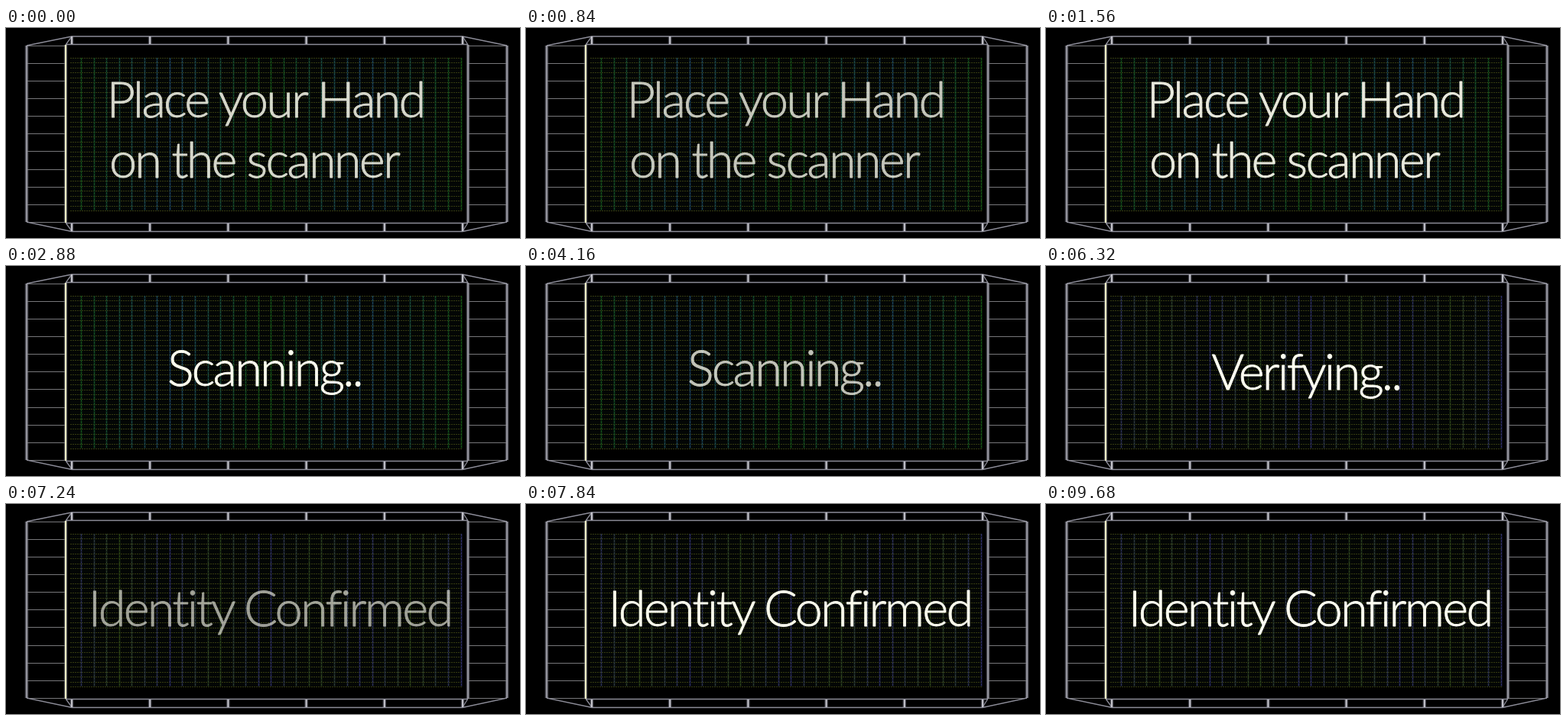
Recreate the animation shown at these times as an HTML page. Size 672 px wide and 275 px high, loop 10 s.

```html
<!DOCTYPE html>
<html lang="en">
<head>
<meta charset="utf-8">
<title>Hand scanner</title>
<style>
  html, body { margin: 0; width: 100%; height: 100%; overflow: hidden; background: #000; }
  svg { display: block; width: 100vw; height: 100vh; }
  .thin { stroke: #77777a; }
  .edge { stroke: #8c8c98; stroke-width: 1.3; }
  .halo { stroke: #62626c; stroke-width: 4.5; opacity: .75; }
  .core { stroke: #cfcfd6; stroke-width: 1.8; }
  .side { stroke: #a6a6ae; stroke-width: 1.6; }
  .inner { stroke: #f6f6c4; stroke-width: 2; }
  .rows { stroke: #353a10; }
  .soft { stroke-width: 3; opacity: .25; }
  .early { stroke: url(#teal); animation: early 10s step-end infinite; }
  .late { stroke: url(#indigo); animation: late 10s step-end infinite; }
  text {
    font: 300 65px Lato, "Open Sans", sans-serif;
    letter-spacing: -.043em;
    text-anchor: middle;
    fill: #fffff2;
    stroke: #fffff2;
    stroke-width: .8;
    stroke-linejoin: round;
  }
  .words { animation: pulse 833.333ms cubic-bezier(.37, 0, .63, 1) -1200ms infinite alternate; }
  .msg { visibility: hidden; animation: 10s step-end infinite; }
  .place { animation-name: place; }
  .scan { animation-name: scan; }
  .verify { animation-name: verify; }
  .done { animation-name: done; }
  @keyframes pulse { from { opacity: .6; } to { opacity: 1; } }
  @keyframes place { 0% { visibility: visible; } 21.2%, 100% { visibility: hidden; } }
  @keyframes scan { 0% { visibility: hidden; } 21.2% { visibility: visible; } 54.8%, 100% { visibility: hidden; } }
  @keyframes verify { 0% { visibility: hidden; } 54.8% { visibility: visible; } 71.2%, 100% { visibility: hidden; } }
  @keyframes done { 0% { visibility: hidden; } 71.2%, 100% { visibility: visible; } }
  @keyframes early { 0% { visibility: visible; } 42%, 100% { visibility: hidden; } }
  @keyframes late { 0% { visibility: hidden; } 42%, 100% { visibility: visible; } }
</style>
</head>
<body>
<svg viewBox="0 0 672 275" preserveAspectRatio="none" fill="none">
  <defs>
    <linearGradient id="teal" gradientUnits="userSpaceOnUse" x1="84" x2="212" y1="0" y2="0" spreadMethod="reflect">
      <stop stop-color="#125212"/>
      <stop offset="1" stop-color="#1c4262"/>
    </linearGradient>
    <linearGradient id="indigo" gradientUnits="userSpaceOnUse" x1="84" x2="148" y1="0" y2="0" spreadMethod="reflect">
      <stop stop-color="#2c2c68"/>
      <stop offset="1" stop-color="#2b4314"/>
    </linearGradient>
    <path id="cols"/>
  </defs>
  <rect width="672" height="275" fill="#000"/>
  <rect x="84" y="39" width="512" height="200" fill="#030605"/>
  <path class="rows" id="rows" stroke-dasharray="2 1"/>
  <g class="early">
    <use class="soft" href="#cols"/>
    <use href="#cols" stroke-dasharray="3 1"/>
  </g>
  <g class="late">
    <use class="soft" href="#cols"/>
    <use href="#cols" stroke-dasharray="3 1"/>
  </g>

  <path class="halo" id="halo"/>
  <path class="thin" id="rungs"/>
  <path class="edge" d="M27 23L86 11H597L655 23M27 254L86 266.5H597L655 254M78 21.5H604M78 255.5H604M78 22L86 11M604 22L597 11M78 255L86 266M604 255L597 266"/>
  <path class="core" id="ticks"/>
  <path class="side" d="M27 23V254M655 23V254M604 22V255"/>
  <path class="inner" d="M78 22V255"/>

  <g class="words">
    <g class="msg place">
      <text x="339" y="117">Place your Hand</text>
      <text x="324" y="196">on the scanner</text>
    </g>
    <text class="msg scan" x="338" y="157">Scanning..</text>
    <text class="msg verify" x="340" y="162">Verifying..</text>
    <text class="msg done" x="345" y="160">Identity Confirmed</text>
  </g>
</svg>
<script>
  const draw = (id, d) => document.getElementById(id).setAttribute('d', d);
  const lines = (n, line) => Array.from({ length: n }, (_, i) => line(i)).join('');

  draw('rows', lines(32, i => `M84 ${Math.round(39 + i * 6.45) + .5}H596`));
  draw('cols', lines(31, i => `M${Math.round(98 + i * 16.55) + .5} 39V239`));
  draw('rungs', lines(11, i => {
    const y = Math.round(22.5 + i * 23.15) + .5;
    return `M27 ${y}H78M604 ${y}H655`;
  }));

  const ticks = lines(6, i => {
    const x = 86 + i * 102.2;
    return `M${x} 11V21M${x} 256V266`;
  });
  draw('ticks', ticks);
  draw('halo', ticks + 'M27 23V254M78 22V255M604 22V255M655 23V254');
</script>
</body>
</html>
```
